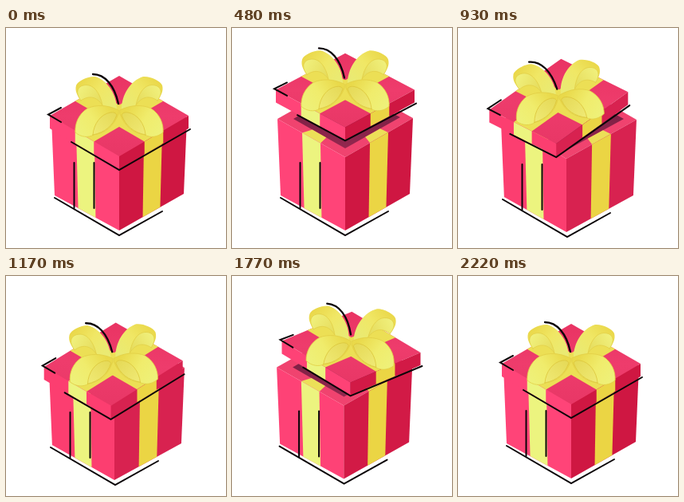
These frames come from a looping animation (276 by 276 pixels, 2.34 s). An HTML page with a canvas:

```html
<!DOCTYPE html>
<html lang="en">
<head>
<meta charset="utf-8">
<title>Gift box</title>
<style>
html, body { margin: 0; width: 100%; height: 100%; overflow: hidden; background: #fff; }
canvas { display: block; width: 276px; height: 276px; }
</style>
</head>
<body>
<canvas id="stage"></canvas>
<script>
const SIZE = 276, LOOP = 2340, STEP = 30;
const MID_X = 142, MID_Y = 112, LID_HEIGHT = 16;
const canvas = document.getElementById('stage');
const ctx = canvas.getContext('2d');
const dpr = window.devicePixelRatio || 1;
canvas.width = canvas.height = Math.round(SIZE * dpr);

// Timing helpers
const part = (t, from, to) => Math.min(1, Math.max(0, (t - from) / (to - from)));
const hop = (t, from, to) => Math.sin(Math.PI * part(t, from, to));
const ease = (t, from, to) => {
  const u = part(t, from, to);
  return u * u * (3 - 2 * u);
};

// The lid pops up, then hops left and right; the box turns and turns back.
function poseAt(t) {
  const lift = 38.5 * hop(t, 120, 650) + 20 * hop(t, 690, 1180) + 24 * hop(t, 1660, 1960);
  const tilt = -.13 * hop(t, 690, 1230) + .11 * hop(t, 1680, 2010) - .07 * hop(t, 2010, 2220);
  const turn = ease(t, 700, 900) - ease(t, 1660, 1830);
  const squash = 1 - .0025 * lift - .8 * tilt;
  return { lift, tilt, turn, squash };
}

// Drawing helpers
const mix = (a, b, k) =>
  `rgb(${a.map((c, i) => Math.round(c + (b[i] - c) * k)).join(',')})`;
const along = (a, b, k) => [a[0] + (b[0] - a[0]) * k, a[1] + (b[1] - a[1]) * k];
const down = (p, h) => [p[0], p[1] + h];

function trace(pts) {
  ctx.beginPath();
  pts.forEach(p => ctx.lineTo(p[0], p[1]));
}

function poly(color, ...pts) {
  trace(pts);
  ctx.closePath();
  ctx.fillStyle = color;
  ctx.fill();
}

function line(...pts) {
  trace(pts);
  ctx.stroke();
}

function blend(x0, y0, x1, y1, ...colors) {
  const g = ctx.createLinearGradient(x0, y0, x1, y1);
  colors.forEach((c, i) => g.addColorStop(i / (colors.length - 1), c));
  return g;
}

// Ribbon across the quad a-b-c-d, in the middle of side a-b
function ribbon(color, a, b, c, d) {
  const from = .365, to = .635;
  poly(color, along(a, b, from), along(a, b, to), along(d, c, to), along(d, c, from));
}

function walls(l, f, r, lb, fb, rb, turn) {
  poly(mix([255, 68, 120], [252, 62, 112], turn), l, f, fb, lb);
  poly(mix([207, 23, 66], [216, 34, 80], turn), f, r, rb, fb);
  ribbon('#ecf47f', l, f, fb, lb);
  ribbon('#ebd544', f, r, rb, fb);
}

const turned = (x, y, turn) => x - turn * (3 + .06 * (y - MID_Y));

function drawBase({ turn }) {
  const at = (x, y, drop = 0) => [turned(x, y, turn), y + drop + 2 * turn];
  const l = at(57, 114), f = at(142, 162), r = at(227, 113);
  const il = at(77, 114), inf = at(142, 151), ir = at(211, 112);
  poly('#f0436f', l, f, r, at(142, 66));
  poly(blend(0, 80, 0, 151, '#6f1c3e', '#94274f'), il, inf, ir, at(142, 76));
  ribbon('#ecdf58', l, f, inf, il);
  ribbon('#ecdf58', f, r, ir, inf);
  walls(l, f, r, at(61, 114, 96), at(142, 162, 92), at(223, 113, 95), turn);
  ctx.save();
  ctx.translate(-5 * turn, 2 * turn);
  line([61, 213], [142, 260], [196, 230]);
  for (const x of [85.5, 110.5]) line([x, 169], [x, 226]);
  ctx.restore();
}

function drawLid({ lift, tilt, turn, squash }) {
  const at = (x, y) => [
    turned(x, y, turn) + 100 * tilt,
    MID_Y + 1.5 * turn - lift + tilt * (x - MID_X) + squash * (y - MID_Y)
  ];
  const l = at(55, 110), f = at(142, 161), r = at(229, 110), b = at(142, 60);
  poly(blend(b[0], b[1], f[0], f[1], '#e93463', '#ee3c6c', '#e83766'), l, f, r, b);
  ribbon('#ecdf55', l, f, r, b);
  ribbon('#ecdf55', f, r, b, l);
  walls(l, f, r, ...[l, f, r].map(p => down(p, LID_HEIGHT)), turn);
  line(at(69, 100), at(53, 108.5), at(69, 118));
  line(...[at(82, 127), at(142, 162), at(231, 111)].map(p => down(p, LID_HEIGHT)));
}

const BACK = new Path2D('M139 102C139 84 128 66 112 61C104 60 90 66 88 72C86 80 90 85 94 91C104 84 114 86 121 97Z');
const BACK_IN = new Path2D('M94 91C87 82 89 74 97 72C110 69 118 82 121 97C114 86 104 84 94 91Z');
const FRONT = new Path2D('M141 103C128 96 112 96 102 101C91 108 86 120 87 131C94 137 103 138 110 134C124 132 135 124 141 108Z');
const FRONT_IN = new Path2D('M109 134C110 120 119 108 131 106Q137 105 139 109C134 123 124 131 109 134Z');
const ARC = new Path2D('M109 58C124 58 136 72 141 95');

function fill(path, style, edge) {
  ctx.fillStyle = style;
  ctx.fill(path);
  if (!edge) return;
  ctx.save();
  ctx.strokeStyle = edge;
  ctx.lineWidth = .8;
  ctx.stroke(path);
  ctx.restore();
}

function bothSides(paint) {
  paint();
  ctx.save();
  ctx.translate(2 * MID_X, 0);
  ctx.scale(-1, 1);
  paint();
  ctx.restore();
}

function drawBow({ lift, tilt, turn }) {
  ctx.save();
  ctx.translate(MID_X - 3 * turn + 100 * tilt, 105 + 1.5 * turn - lift);
  ctx.rotate(.7 * tilt);
  ctx.translate(-MID_X, -105);
  bothSides(() => {
    fill(BACK, blend(96, 64, 132, 96, '#ead84a', '#f0e765', '#eaea72'));
    fill(BACK_IN, blend(92, 76, 120, 92, '#f0f07c', '#e6dc5c'), '#e2cf46');
  });
  bothSides(() => {
    fill(FRONT, blend(88, 130, 132, 100, '#eef17a', '#f0ec6c', '#e9d94a'), '#e2cf46');
    fill(FRONT_IN, blend(110, 132, 136, 108, '#efe974', '#e6da58'), '#dcc63c');
  });
  ctx.lineWidth = 2.3;
  ctx.stroke(ARC);
  ctx.restore();
}

function draw(t) {
  const pose = poseAt(t);
  ctx.setTransform(dpr, 0, 0, dpr, 0, 0);
  ctx.fillStyle = '#fff';
  ctx.fillRect(0, 0, SIZE, SIZE);
  ctx.strokeStyle = '#0b0508';
  ctx.lineWidth = 2;
  ctx.lineCap = 'round';
  drawBase(pose);
  drawLid(pose);
  drawBow(pose);
}

const start = performance.now();
function tick() {
  const t = (performance.now() - start) % LOOP;
  draw(Math.floor(t / STEP) * STEP);
  requestAnimationFrame(tick);
}
tick();
</script>
</body>
</html>
```
